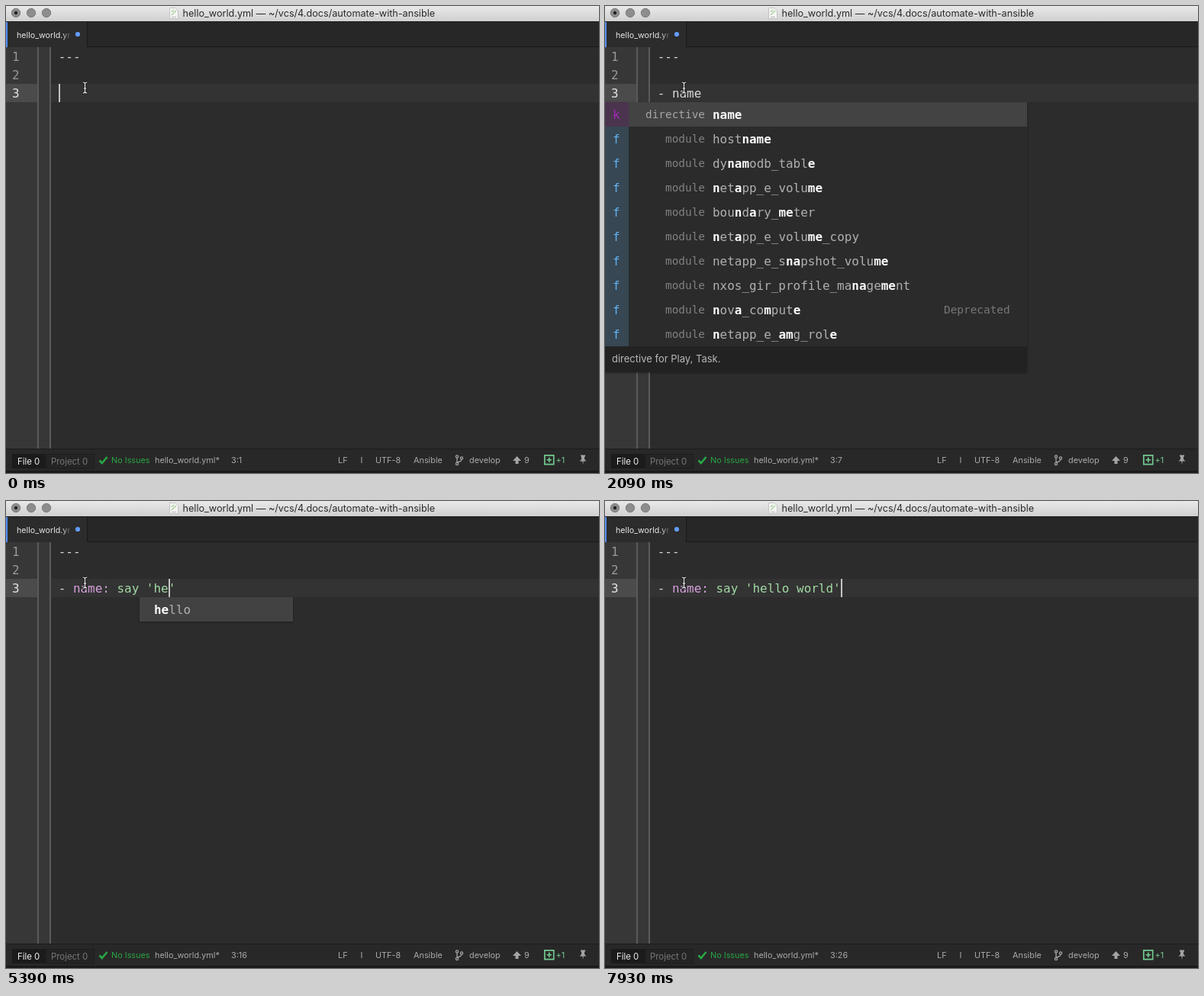
These frames come from a looping animation (777x612 px, 8000 ms). An HTML page:

```html
<!DOCTYPE html>
<html lang="en">
<head>
<meta charset="utf-8">
<title>Editor typing</title>
<style>
html, body { margin: 0; width: 100%; height: 100%; overflow: hidden; background: #2c2c2c; }
svg { display: block; width: 777px; height: 612px; }
text { font-family: Inter, sans-serif; white-space: pre; }
.mono, .mono text { font-family: "DejaVu Sans Mono", monospace; font-size: 15.95px; }
.bar text { font-size: 10.85px; fill: #aaa; }
.bar .btn { font-size: 11.4px; }
.key { fill: #d7a1de; }
.str { fill: #a2d9a3; }
.mono .label { font-size: 14.4px; fill: #818181; }
.word { fill: #b0b0b0; }
.hit { fill: #fafafa; font-weight: bold; }
</style>
</head>
<body>
<svg viewBox="0 0 777 612">
  <defs>
    <linearGradient id="chrome" x2="0" y2="1">
      <stop stop-color="#e9e9e9"/><stop offset="1" stop-color="#d0d0d0"/>
    </linearGradient>
    <linearGradient id="fade">
      <stop stop-color="#2c2c2c" stop-opacity="0"/><stop offset="1" stop-color="#2c2c2c"/>
    </linearGradient>
    <clipPath id="tabClip"><path d="M0 20H84V54H0z"/></clipPath>
    <filter id="shadow" x="-5%" y="-5%" width="110%" height="112%">
      <feDropShadow dx="0" dy="1" stdDeviation="1.5" flood-opacity=".35"/>
    </filter>
    <path id="beamLine" d="M101 100Q103.500 100 103.500 102V112Q103.500 114 101 114M106 100Q103.500 100 103.500 102M106 114Q103.500 114 103.500 112M102 108H105"/>
  </defs>

  <rect width="777" height="612" fill="#2c2c2c"/>

  <!-- gutter and text rows -->
  <path d="M0 54H58V580H0z" fill="#373737"/>
  <path d="M0 102H41V126H0z" fill="#4b4b4b"/>
  <path d="M58 102H777V126H58z" fill="#333"/>
  <path d="M42 54V580M58 54V580" stroke="#5a5a5a" stroke-width="2"/>
  <g class="mono" fill="#999">
    <text x="8" y="72">1</text>
    <text x="8" y="96">2</text>
    <text x="8" y="120" fill="#e4e4e4">3</text>
    <text x="68.700" y="72" fill="#d8d8d8">---</text>
    <text id="line" x="68.700" y="120" fill="#dadada"></text>
  </g>
  <rect id="caret" y="102" width="2" height="24" fill="#c4c4c4"/>

  <!-- title bar -->
  <rect width="777" height="20" fill="url(#chrome)"/>
  <path d="M0 20.5H777" stroke="#1d1d1d"/>
  <g fill="#8d8d8d" stroke="#7b7b7b">
    <circle cx="13" cy="9" r="5.7"/><circle cx="33" cy="9" r="5.7"/><circle cx="53" cy="9" r="5.7"/>
  </g>
  <circle cx="13" cy="9" r="2.2" fill="#222"/>
  <path d="M214.500 2.500H222L225.500 6V16.500H214.500z" fill="#f4f4f2" stroke="#c4c4c4"/>
  <path d="M217 12L223 6M217 8L220 5" stroke="#a9cf9f" stroke-width="1.3"/>
  <path d="M217 14.500H223" stroke="#b5b5b5"/>
  <text x="396.800" y="14" font-size="12.650" text-anchor="middle" fill="#2a2a2a">hello_world.yml — ~/vcs/4.docs/automate-with-ansible</text>

  <!-- tabs -->
  <path d="M106 21H777V53H106z" fill="#272727"/>
  <path d="M106.500 21V53.500H777" fill="none" stroke="#191919"/>
  <path d="M0 21H2V54H0z" fill="#528bff"/>
  <text x="14" y="42" font-size="10.700" fill="#e6e6e6" clip-path="url(#tabClip)">hello_world.yml</text>
  <path d="M74 28H86V48H74z" fill="url(#fade)"/>
  <circle cx="94" cy="37" r="3.100" fill="#639cff"/>

  <!-- status bar -->
  <g class="bar">
    <path d="M0 580H777V612H0z" fill="#282828"/>
    <path d="M0 580.500H777" stroke="#1b1b1b"/>
    <path d="M0 609H777V612H0z" fill="#1a1a1a"/>
    <path d="M8 587H52V606H8z" fill="#1b1b1b"/>
    <path d="M53 587.500H115.500V606H53z" fill="#242424" stroke="#1d1d1d"/>
    <text class="btn" x="15" y="601" style="fill:#f0f0f0">File 0</text>
    <text class="btn" x="59" y="601" style="fill:#777">Project 0</text>
    <path d="M122.500 595.500L125.800 599L132.500 591" fill="none" stroke="#28a745" stroke-width="2.600"/>
    <text x="138" y="599" style="fill:#28a745">No Issues</text>
    <text x="195" y="599">hello_world.yml*</text>
    <text id="pos" x="295" y="599"></text>
    <text x="435" y="599">LF</text>
    <text x="464.500" y="599">I</text>
    <text x="484" y="599">UTF-8</text>
    <text x="534" y="599">Ansible</text>
    <g fill="none" stroke="#a4a4a4" stroke-width="1.300">
      <circle cx="591" cy="590.500" r="1.600"/><circle cx="591" cy="600" r="1.600"/><circle cx="597" cy="592.500" r="1.600"/>
      <path d="M591 592V598.500M597 594Q597 597 591 598"/>
    </g>
    <text x="607" y="599">develop</text>
    <path d="M669.500 590L675 596H671.500V600H667.500V596H664z" fill="#a4a4a4"/>
    <text x="679" y="599">9</text>
    <path d="M705.800 588.800H717.700V600.700H705.800zM711.750 591.500V598M708.500 594.750H715" fill="none" stroke="#73c990" stroke-width="1.700"/>
    <text x="720.500" y="599" style="fill:#73c990">+1</text>
    <path d="M753 588.500H759V590L758 591V594L760.500 596.500H756.700L756 601L755.300 596.500H751.500L754 594V591L753 590z" fill="#a4a4a4"/>
  </g>

  <g id="popup" class="mono"></g>

  <g id="beam" fill="none" stroke-linecap="round">
    <use href="#beamLine" stroke="#111" stroke-width="3"/>
    <use href="#beamLine" stroke="#f2f2f2" stroke-width="1.200"/>
  </g>
  <path id="arrow" d="M103.700 104V119.200L107.200 116L109.600 121.800L112.300 120.600L109.900 115.200H114.700z" fill="#0c0c0c" stroke="#f4f4f4" stroke-width="1.200"/>
</svg>

<script>
const LOOP = 8000, CHAR = 9.6, LEFT = 69;
const $ = id => document.getElementById(id);

// [start ms, line with | at the caret, options]
const steps = [
  [0, '|'],
  [450, '-|'],
  [600, '- |'],
  [900, '- n|'],
  [1190, '- na|'],
  [1340, '- na|', { arrow: 1 }],
  [1490, '- na|', { arrow: 1, list: 2 }],
  [1940, '- nam|', { arrow: 1, list: 3 }],
  [2090, '- name|', { list: 4, off: 1 }],
  [2240, '- name: |'],
  [2690, '- name: |', { off: 1 }],
  [3140, '- name: |'],
  [3440, '- name: |', { off: 1 }],
  [3890, '- name: s|'],
  [4190, '- name: say|'],
  [4490, '- name: say |'],
  [4790, "- name: say '|'"],
  [5090, "- name: say 'h|'"],
  [5240, "- name: say 'h|'", { word: 'hello' }],
  [5390, "- name: say 'he|'", { word: 'hello' }],
  [5540, "- name: say 'hel|'", { word: 'hello' }],
  [5690, "- name: say 'hell|'", { word: 'hello' }],
  [5840, "- name: say 'hello|'", { word: 'hello' }],
  [6140, "- name: say 'hello |'"],
  [6440, "- name: say 'hello w|'"],
  [6730, "- name: say 'hello wo|'", { word: 'world' }],
  [6880, "- name: say 'hello wor|'", { word: 'world' }],
  [7030, "- name: say 'hello world|'", { word: 'world' }],
  [7330, "- name: say 'hello world|'", { word: 'world', off: 1 }],
  [7780, "- name: say 'hello world|'"],
  [7930, "- name: say 'hello world'|"]
];

// capitals mark the letters that match "name"
const modules = ['NAME', 'hostNAME', 'dyNAModb_tablE', 'NetApp_e_voluME', 'bouNdAry_MEter',
  'NetApp_e_voluME_copy', 'netapp_e_sNApshot_voluME', 'nxos_gir_profile_maNAgeMEnt',
  'NovA_coMputE', 'Netapp_e_AMg_rolE'];

const rect = (x, y, w, h, fill) =>
  `<rect x="${x}" y="${y}" width="${w}" height="${h}" fill="${fill}"/>`;
const text = (x, y, cls, body, extra = '') =>
  `<text x="${x}" y="${y}" class="${cls}" ${extra}>${body}</text>`;
const span = (cls, body) => `<tspan class="${cls}">${body}</tspan>`;

function marked(word, count) {
  return word.replace(/[A-Z]/g, c => {
    c = c.toLowerCase();
    return count-- > 0 ? span('hit', c) : c;
  });
}

function fullList(count) {
  const rows = modules.map((word, i) => {
    const y = 126 + i * 32, base = y + 22, first = i === 0;
    return (first ? rect(31, y, 522, 32, '#434343') : '') +
      rect(0, y, 31, 32, first ? '#4b344d' : '#374753') +
      text(10, base, '', first ? 'k' : 'f', `fill="${first ? '#a32bbd' : '#62b1f0'}"`) +
      text(131, base - 1, 'label', first ? 'directive' : 'module',
        'text-anchor="end"' + (first ? ' style="fill:#a6a6a6"' : '')) +
      text(141, base, 'word', marked(word, count)) +
      (word.startsWith('NovA') ? text(444, base - 1, 'label', 'Deprecated', 'style="fill:#777"') : '');
  });
  return '<path d="M0 126H553V476Q553 480 549 480H0z" fill="#222" filter="url(#shadow)"/>' +
    rect(0, 126, 553, 320, '#2b2b2b') + rows.join('') +
    text(9, 467, '', 'directive for Play, Task.',
      'style="font:13px Inter,sans-serif" fill="#b8b8b8"');
}

function wordList(word, line) {
  const caret = line.indexOf('|');
  const start = line.lastIndexOf(word[0], caret) === -1 ? caret : line.search(/\w+\|/);
  const typed = caret - start;
  const x = Math.round(LEFT + start * CHAR);
  return `<g filter="url(#shadow)">${rect(x - 19, 126, 201, 32, '#434343')}</g>` +
    text(x, 148, 'word', span('hit', word.slice(0, typed)) + word.slice(typed));
}

function colored(line) {
  const cut = line.indexOf(': ');
  return cut < 0 ? line :
    '- ' + span('key', line.slice(2, cut + 1)) + ' ' + span('str', line.slice(cut + 2));
}

function show([, line, opt = {}]) {
  const col = line.indexOf('|');
  $('line').innerHTML = colored(line.replace('|', ''));
  $('caret').setAttribute('x', Math.round(LEFT + col * CHAR));
  $('caret').style.display = opt.off ? 'none' : '';
  $('pos').textContent = '3:' + (col + 1);
  $('popup').innerHTML = opt.list ? fullList(opt.list) : opt.word ? wordList(opt.word, line) : '';
  $('arrow').style.display = opt.arrow ? '' : 'none';
  $('beam').style.display = opt.arrow ? 'none' : '';
}

const began = performance.now();
let current;
function tick() {
  const t = (performance.now() - began) % LOOP;
  const step = steps.findLast(s => s[0] <= t);
  if (step !== current) show(current = step);
  requestAnimationFrame(tick);
}
tick();
</script>
</body>
</html>
```
